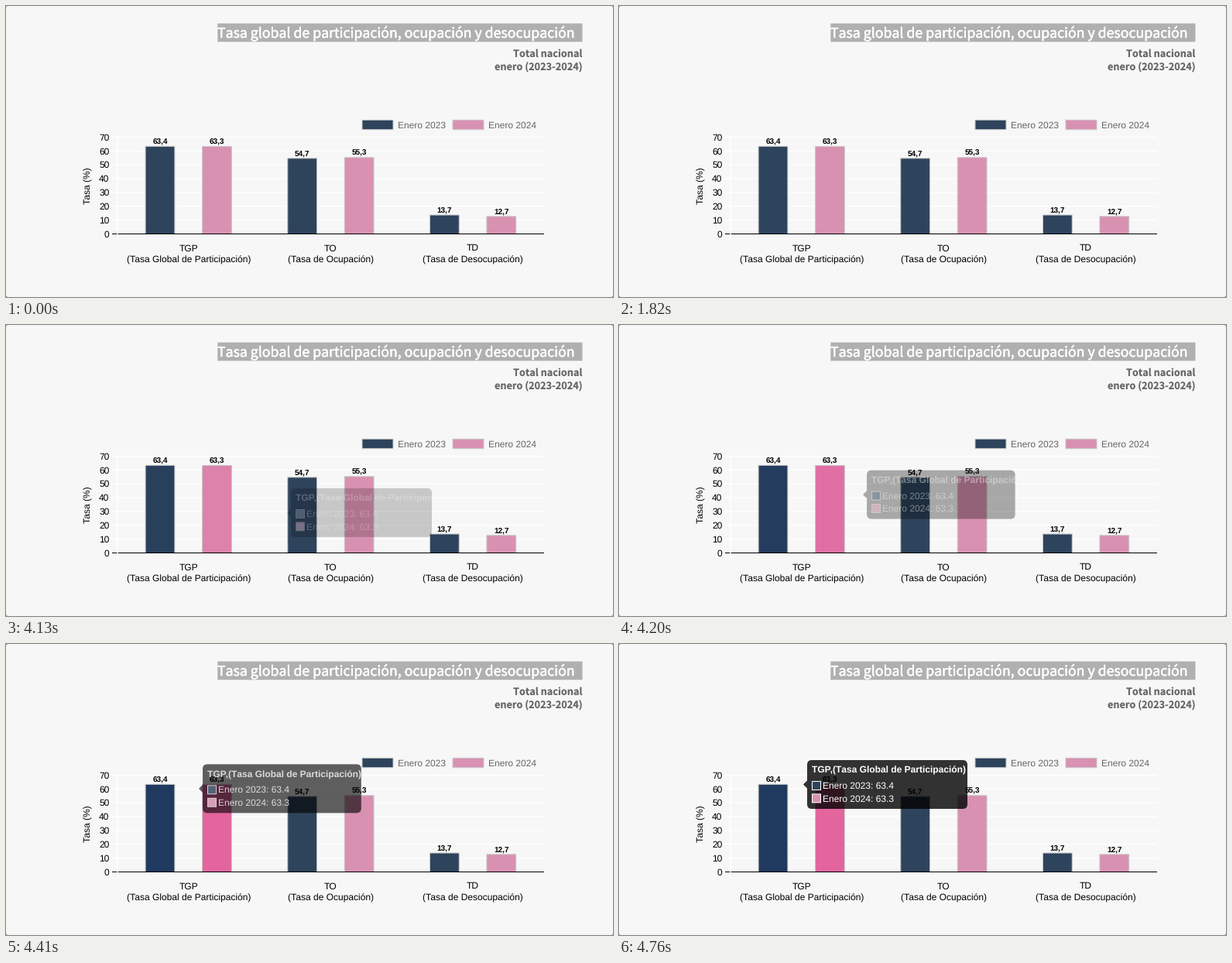
Recreate the animation shown at these times as a matplotlib script. Size 784x376 px, loop 8000 ms.

```python
import matplotlib.pyplot as plt
from matplotlib.animation import FuncAnimation
from matplotlib.patches import FancyBboxPatch, PathPatch, Rectangle
from matplotlib.path import Path
from matplotlib.patheffects import withStroke
import numpy as np

W, H, DPI = 784, 376, 100
INTERVAL, LOOP = 20, 8000
HOVER_START, STEP, EASE = 4130, 70, 615
PX = 72 / DPI
SANS, HEADING = "Liberation Sans", "Noto Sans CJK JP"


def rgb(*channels):
    return np.array(channels) / 255


BACK, GREY = rgb(247, 247, 247), rgb(102, 102, 102)
NAVY, NAVY_HOVER = rgb(46, 68, 92), rgb(32, 57, 95)
PINK, PINK_HOVER = rgb(217, 145, 178), rgb(226, 101, 158)
BORDER = rgb(200, 200, 200)

plt.rcParams["text.hinting"] = "none"
plt.rcParams["text.hinting_factor"] = 1
fig = plt.figure(figsize=(W / DPI, H / DPI), dpi=DPI, facecolor=rgb(150, 150, 150))
ax = fig.add_axes([0, 0, 1, 1])
ax.set(xlim=(0, W), ylim=(H, 0))
ax.axis("off")


def text(x, y, s, size=12, color="black", ha="left", font=SANS, **kw):
    return ax.text(x, y, s, fontsize=size * PX, color=color, ha=ha,
                   va=kw.pop("va", "baseline"), family=font, **kw)


def rect(x, y, w, h, color, edge="none", **kw):
    return ax.add_patch(Rectangle((x, y), w, h, facecolor=color, edgecolor=edge,
                                  linewidth=PX, snap=False, **kw))


def line(xs, ys, color, width=1.4, zorder=0.9):
    ax.plot(xs, ys, color=color, lw=width * PX, solid_capstyle="butt",
            snap=False, zorder=zorder)


# Page and headings
ax.add_patch(FancyBboxPatch((0, 0), W, H, boxstyle="round,pad=0,rounding_size=3",
                            facecolor=BACK, edgecolor="none", zorder=0))
rect(273.3, 22.5, 471.2, 23.8, rgb(176, 176, 176))
text(273, 41, "Tasa global de participación, ocupación y desocupación", 17.7,
     "white", font=HEADING,
     path_effects=[withStroke(linewidth=0.3, foreground="white")])
for y, s in ((66, "Total nacional"), (83.5, "enero (2023-2024)")):
    text(744.5, y, s, 12.7, GREY, "right", HEADING, weight="bold")

# Legend
for x, color, s in ((460, NAVY, "Enero 2023"), (577, PINK, "Enero 2024")):
    rect(x, 147.3, 40, 12.4, color, BORDER)
    text(x + 46, 158, s, color=GREY)

# Axes
LEFT, RIGHT, BASE = 144, 695, 294.5
UNIT = 125 / 70
for value in range(0, 71, 10):
    y = BASE - value * UNIT
    if value:
        line((137, RIGHT), (y, y), "white")
    text(133.5, y + 4.1, str(value), ha="right")
line((137, RIGHT), (BASE, BASE), "black", 1, zorder=2)
line((LEFT, LEFT), (169.5, 302), "white", zorder=2.1)
text(106, 232, "Tasa (%)", ha="center", va="center", rotation=90)

# Bars
GROUPS = [("TGP", "(Tasa Global de Participación)", 63.4, 63.3),
          ("TO", "(Tasa de Ocupación)", 54.7, 55.3),
          ("TD", "(Tasa de Desocupación)", 13.7, 12.7)]
SLOT = (RIGHT - LEFT) / len(GROUPS)
bars = []
for i, (short, full, *values) in enumerate(GROUPS):
    mid = LEFT + SLOT * (i + 0.5)
    text(mid, 316.5, short, ha="center")
    text(mid, 331.5, full, ha="center")
    for side, value, color in zip((-1, 1), values, (NAVY, PINK)):
        x, top = mid + side * SLOT / 5, BASE - value * UNIT
        bars.append(rect(x - 19, top, 37.8, BASE - top, color, BORDER))
        text(x, top - 2.8, f"{value}".replace(".", ","), 10, ha="center",
             weight="bold")


def tooltip_path(x, y, w, h, r=6, caret=5):
    """Rounded box with a caret in the middle of its left side."""
    x2, y2, mid = x + w, y + h, y + h / 2
    M, L, C = Path.MOVETO, Path.LINETO, Path.CURVE3
    points = [(x + r, y), (x2 - r, y), (x2, y), (x2, y + r),
              (x2, y2 - r), (x2, y2), (x2 - r, y2),
              (x + r, y2), (x, y2), (x, y2 - r),
              (x, mid + caret), (x - caret, mid), (x, mid - caret),
              (x, y + r), (x, y), (x + r, y)]
    return Path(points, [M, L, C, C, L, C, C, L, C, C, L, L, L, L, C, C])


# Tooltip: each part keeps its offset from the box corner
box = ax.add_patch(PathPatch(tooltip_path(0, 0, 1, 1), facecolor="black",
                             edgecolor="none", zorder=5))
name, detail, *rates = GROUPS[0]
labels = [(6, 17, text(0, 0, f"{name},{detail}", 11.8, "white", weight="bold",
                       zorder=7))]
swatches = []
for row, (year, rate, color) in enumerate(zip((2023, 2024), rates, (NAVY, PINK))):
    y = 27 + 16.4 * row
    labels.append((20, y + 10, text(0, 0, f"Enero {year}: {rate}", color="white",
                                    zorder=7)))
    swatches += [(6, y, rect(0, 0, 12, 12, "white", zorder=6)),
                 (7, y + 1, rect(0, 0, 10, 10, color, zorder=6.5))]
parts = labels + swatches


def update(frame):
    elapsed = (frame + 1) * INTERVAL - HOVER_START
    shown = elapsed >= 0
    left = max(0, 1 - elapsed // STEP * STEP / EASE) if shown else 1
    opacity = 1 - 0.76 * left ** 2
    travel = left ** 4
    glow = 1 - 0.67 * left ** 8 if shown else 0

    bars[0].set_facecolor(NAVY + (NAVY_HOVER - NAVY) * glow)
    bars[1].set_facecolor(PINK + (PINK_HOVER - PINK) * glow)

    x, y = 243 + 125 * travel, 150 + 61 * travel
    box.set_path(tooltip_path(x, y, 207 - 25 * travel, 63))
    box.set_alpha(0.8 * opacity)
    box.set_visible(shown)
    for dx, dy, part in parts:
        place = part.set_xy if isinstance(part, Rectangle) else part.set_position
        place((x + dx, y + dy))
        part.set_alpha(opacity)
        part.set_visible(shown)
    return [box, *bars[:2], *(part for *_, part in parts)]


animation = FuncAnimation(fig, update, frames=LOOP // INTERVAL, interval=INTERVAL,
                          repeat=True, repeat_delay=0, blit=False)
plt.show()
```
